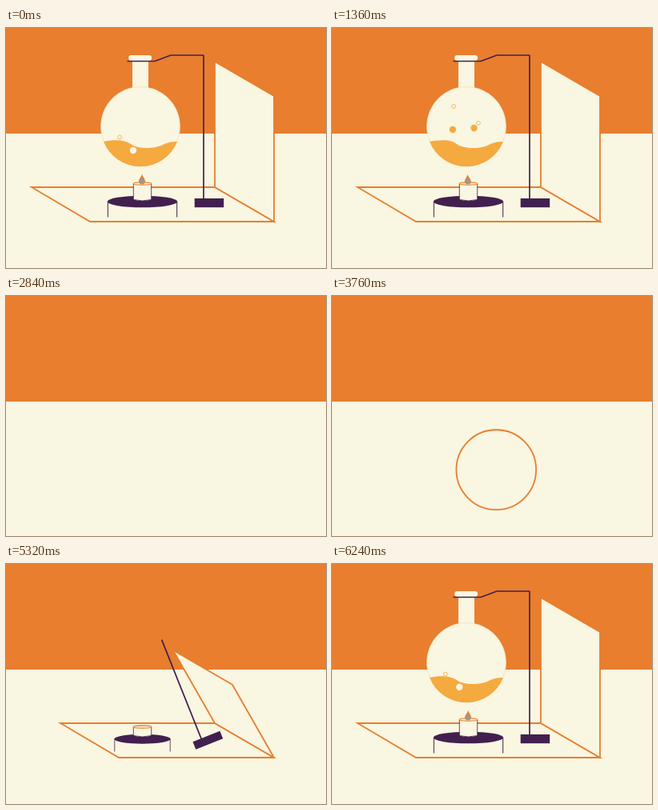
Animation of 400 by 300 pixels, one loop 6280 ms. Source, as an HTML page:

```html
<!DOCTYPE html>
<html lang="en">
<head>
<meta charset="utf-8">
<title>Pop-up laboratory</title>
<style>
  html, body { margin: 0; width: 100%; height: 100%; overflow: hidden; background: #f9f6e1; }
  svg { display: block; width: 100%; height: 100%; }
  .line { fill: none; stroke: #e87e2e; stroke-width: 1.8; }
  .ink { fill: none; stroke: #41204f; stroke-width: 1.7; }
  .paper { fill: #f9f6e1; }
  .dark { fill: #41204f; }
  .juice { fill: #f5aa40; }
</style>
</head>
<body>
<svg viewBox="0 0 400 300">
  <defs><clipPath id="inLiquid"><path id="liquidClip"/></clipPath></defs>
  <rect class="paper" width="400" height="300"/>
  <rect width="400" height="132" fill="#e87e2e"/>
  <path id="floor" class="line"/>
  <g id="tripod">
    <path class="ink" style="stroke-width:1" d="M127.3 217V236.5M213.7 217V236.5"/>
    <ellipse class="dark" cx="170.5" cy="217" rx="43.7" ry="7.3"/>
  </g>
  <g id="candle">
    <path id="wax" class="paper" stroke="#41204f" stroke-width=".8"/>
    <ellipse id="rim" class="paper" cx="170.5" rx="11.2" ry="1.6" stroke="#e87e2e" stroke-width="1.3"/>
    <g id="flame">
      <path d="M0-12C1-8 4-6 4-2.5C4 2-4 2-4-2.5C-4-6-1-8 0-12Z" fill="#e87e2e"/>
      <path d="M0-8C1-6 3-4 3-2C3 1-3 1-3-2C-3-4-1-6 0-8Z" fill="#9b9a94"/>
    </g>
  </g>
  <g id="stand">
    <rect id="base" class="dark" x="235.7" y="213" width="36.5" height="11.2"/>
    <path id="rod" class="ink"/>
    <g id="top">
      <g id="flask">
        <rect class="paper" x="158" y="38" width="20" height="46"/>
        <rect class="paper" x="153.3" y="34" width="28.7" height="7" rx="3"/>
        <circle class="paper" cx="168" cy="123" r="49.5" stroke="#f6dcb4" stroke-width=".7"/>
        <g id="bubbles"></g>
        <path id="liquid" class="juice"/>
        <g id="drops" clip-path="url(#inLiquid)"></g>
      </g>
      <path id="arm" class="ink" pathLength="1" stroke-dasharray="1 2" d="M247 34H206L186 41.5H151.5"/>
    </g>
  </g>
  <path id="lid" class="line" style="fill:#f9f6e1" stroke-linejoin="bevel"/>
  <path id="edge" class="line"/>
  <rect id="ring" class="line"/>
</svg>
<script>
const LOOP = 6280;
const $ = id => document.getElementById(id);
const set = (el, attrs) => { for (const k in attrs) el.setAttribute(k, attrs[k]); };
const show = (el, on) => el.setAttribute('visibility', on ? 'inherit' : 'hidden');
const mix = (a, b, u) => a + (b - a) * u;
const clamp = u => Math.min(1, Math.max(0, u));
const ramp = (t, a, b) => (1 - Math.cos(Math.PI * clamp((t - a) / (b - a)))) / 2;
// 1 while the scene stands: falls during [a, b], rises during [c, d]
const stage = (t, a, b, c, d) => t < 3200 ? 1 - ramp(t, a, b) : ramp(t, c, d);
const scaleAt = (x, y, sx, sy = sx) =>
  `translate(${x} ${y}) scale(${sx} ${sy}) translate(${-x} ${-y})`;

// birth and speeds in seconds, position at time zero
const bubbles = [
  { x: 159, y: 153, vx: -5.9, vy: -19.1, r: 4.2, born: -.7 },
  { x: 174, y: 162, vx: 2.6, vy: -27.2, r: 4.2, born: .1 },
  { x: 142, y: 136.5, vx: 7.4, vy: -28.3, r: 2.4, born: -.6, hollow: true },
  { x: 179, y: 157, vx: 2.9, vy: -28, r: 2.4, born: .25, hollow: true }
];
const addCircle = (parent, attrs) => {
  const c = document.createElementNS('http://www.w3.org/2000/svg', 'circle');
  set(c, attrs);
  parent.appendChild(c);
  return c;
};
for (const b of bubbles) {
  b.parts = b.hollow
    ? [addCircle($('drops'), { fill: 'none', stroke: '#f9d9a4' }),
       addCircle($('bubbles'), { fill: 'none', stroke: '#f5b75c' })]
    : [addCircle($('bubbles'), { class: 'juice' }), addCircle($('drops'), { class: 'paper' })];
}

function drawFlask(t) {
  const sway = Math.sin(2 * Math.PI * t / 1570);
  const d = `M122 142C136 ${139 - sway} 148 ${139.5 + sway} 156 145` +
    `C164 ${152 + sway} 186 ${151 - sway} 196 146C203 142.5 208 142 214 142` +
    'A49.5 49.5 0 0 1 122 142Z';
  set($('liquid'), { d });
  set($('liquidClip'), { d });
  const s = (t > 3200 ? t - LOOP : t) / 1000;
  for (const b of bubbles) {
    const cy = b.y + b.vy * s;
    const r = b.r * clamp((s - b.born) / .3) * clamp((cy - 82) / 8);
    for (const c of b.parts) set(c, { cx: b.x + b.vx * s, cy, r });
  }
}

function drawStand(t, open) {
  const closing = t < 3200;
  const tilt = (closing ? 78 : 66) * (1 - open);
  const lean = 1 - open;
  const size = stage(t, 1990, 2080, 5000, 5250);
  const long = 179 * (closing ? 1 - ramp(t, 1480, 1900) : Math.pow(open, .75));
  const arm = stage(t, 1420, 1640, 5400, 5640);
  const flask = stage(t, 1400, 1680, 5480, 5800);
  set($('stand'), {
    transform: `translate(${254 - 5 * lean} ${218.5 + 5 * lean}) rotate(${-tilt}) scale(${size}) translate(-254 -218.5)`
  });
  set($('base'), { transform: scaleAt(254, 218.5, 1, mix(.75, 1, open)) });
  set($('rod'), { d: `M247 217V${213 - long}` });
  set($('top'), { transform: `translate(0 ${179 - long})` });
  set($('arm'), { 'stroke-dashoffset': 1 - arm });
  set($('flask'), { transform: scaleAt(168, 41, flask) });
  show($('arm'), arm > .001);
  show($('flask'), flask > .001);
  show($('stand'), size > .001);
}

function drawBurner(t) {
  const size = stage(t, 1900, 2080, 4960, 5470);
  const tall = stage(t, 1700, 2080, 5120, 5500);
  const fire = stage(t, 1750, 2050, 5450, 5720);
  set($('tripod'), { transform: scaleAt(170.5, 226, size) });
  show($('tripod'), size > .001);
  const y = 214.5 - 20 * tall;
  set($('wax'), { d: `M159.3 ${y}V214.5Q170.5 217.5 181.7 214.5V${y}` });
  set($('rim'), { cy: y });
  show($('candle'), tall > .02);
  const flick = Math.sin(2 * Math.PI * t / 628);
  set($('flame'), {
    transform: `translate(170 ${y}) skewX(${flick * 3}) scale(${fire} ${fire * (1 - .04 * Math.abs(flick))})`
  });
  show($('flame'), fire > .01);
}

function drawBook(t, open) {
  const closing = t < 3200;
  const left = closing ? 32 : 261 - 229 * ramp(t, 4640, 5560);
  const right = closing ? 261 - 229 * ramp(t, 2070, 2440) : 261;
  const wide = right - left;
  set($('floor'), { d: `M${left} 199H${right}L${right + 74} 242H${left + 73}Z` });
  show($('floor'), wide > .5);
  const angle = open * Math.PI / 2;
  const size = closing ? Math.min(157, wide) : 157 * open;
  const dx = -size * Math.cos(angle), dy = -size * Math.sin(angle);
  set($('lid'), {
    d: `M${right} 199L${right + dx} ${199 + dy}L${right + 74 + dx} ${242 + dy}L${right + 74} 242Z`
  });
  show($('lid'), size > .5);
}

function drawEdge(t) {
  const out = t >= 2400 && t < 2840, back = t >= 4360 && t < 4720;
  show($('edge'), out || back);
  if (out) {
    const turn = ramp(t, 2400, 2600), shrink = 1 - ramp(t, 2580, 2830);
    const x = 36.5 * (1 - turn) * shrink, y = mix(21.5, 30, turn) * shrink;
    set($('edge'), { d: `M${68.5 - x} ${220.5 - y}L${68.5 + x} ${220.5 + y}`, 'style': 'stroke-width:1.8' });
  } else if (back) {
    const u = ramp(t, 4360, 4680);
    set($('edge'), {
      d: `M${mix(298, 261, u)} 199L${mix(298, 335, u)} ${mix(260, 242, u)}`,
      'style': `stroke-width:${mix(2.6, 1.8, u)}`
    });
  }
}

function drawRing(t) {
  const on = t > 2840 && t < 4360;
  show($('ring'), on);
  if (!on) return;
  const grow = ramp(t, 2840, 3160), u = ramp(t, 3740, 4360);
  const w = mix(100, .8, u) * grow, h = mix(100, 60, u) * grow;
  const cx = mix(205, 298, u), cy = mix(217, 229.5, u) + 16 * Math.sin(Math.PI * u);
  set($('ring'), { x: cx - w / 2, y: cy - h / 2, width: w, height: h, rx: w / 2, ry: h / 2 * (1 - u) });
}

function draw(t) {
  const open = stage(t, 1400, 2078, 5000, 5526);
  drawBook(t, open);
  drawBurner(t);
  drawStand(t, open);
  drawFlask(t);
  drawEdge(t);
  drawRing(t);
}

const start = performance.now();
function tick() {
  draw((performance.now() - start) % LOOP);
  requestAnimationFrame(tick);
}
tick();
</script>
</body>
</html>
```
